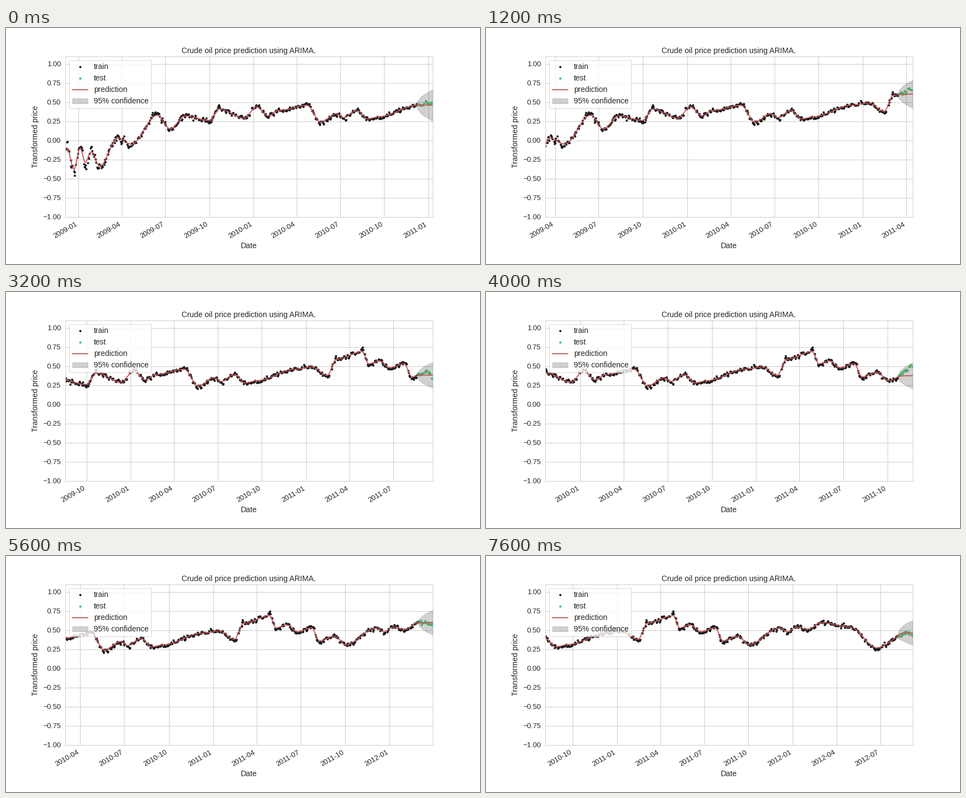
A matplotlib script that plays this animation: 864x432 px, repeating every 8000 ms.

```python
import numpy as np
import matplotlib.pyplot as plt
import matplotlib.dates as mdates
from matplotlib.animation import FuncAnimation

INK, BLACK = "0.15", (0.1, 0.1, 0.1)
GREEN, RED = "#55A868", "#C44E52"
FRAMES, INTERVAL = 20, 400
STEP = TEST = 22                         # trading days
TRAIN = 23 * STEP
START = np.datetime64("2008-12-04")

plt.rcParams.update({
    "font.family": "Liberation Sans", "font.size": 14,
    "text.color": INK, "axes.labelcolor": INK,
    "xtick.color": INK, "ytick.color": INK,
    "xtick.labelsize": 13, "ytick.labelsize": 13,
    "xtick.major.size": 0, "ytick.major.size": 0,
    "xtick.major.pad": 8, "ytick.major.pad": 8,
    "axes.edgecolor": "0.8", "axes.linewidth": 1, "axes.axisbelow": True,
    "axes.grid": True, "grid.color": "0.8", "grid.linewidth": 1,
    "axes.titlesize": 14, "legend.fontsize": 14,
})

# Turning points of the trend: (days since START, price in hundredths).
TURNS = [
    (4, -10), (18, -38), (31, -10), (42, -29), (54, -15), (72, -34),
    (110, 3), (138, -5), (192, 33), (219, 15), (250, 32), (300, 26),
    (322, 41), (374, 29), (399, 44), (424, 32), (445, 39), (505, 46),
    (533, 24), (567, 35), (581, 30), (609, 39), (631, 28), (655, 31),
    (735, 46), (770, 49), (802, 38), (821, 59), (875, 69), (888, 53),
    (910, 57), (932, 48), (962, 53), (978, 36), (1010, 42), (1032, 31),
    (1095, 53), (1112, 48), (1130, 54), (1155, 51), (1182, 60),
    (1242, 54), (1297, 27), (1360, 46), (1372, 44),
]


def trading_days(count):
    """Weekdays from START on, without the exchange holidays."""
    closed = ["2009-04-10", "2009-11-27", "2010-04-02", "2011-04-22", "2012-04-06"]
    for year in range(2008, 2013):
        # (month, which Monday or Thursday); -1 before June is the last of May
        for month, nth, weekday in (("01", 2, "Mon"), ("02", 2, "Mon"),
                                    ("06", -1, "Mon"), ("09", 0, "Mon"),
                                    ("11", 3, "Thu")):
            closed.append(np.busday_offset(f"{year}-{month}", nth,
                                           roll="forward", weekmask=weekday))
        for fixed in ("01-01", "07-04", "12-25"):
            date = np.datetime64(f"{year}-{fixed}")
            weekday = int((date.astype(int) + 3) % 7)
            shift = {5: 0 if fixed == "01-01" else -1, 6: 1}.get(weekday, 0)
            closed.append(date + shift)
    holidays = np.array(closed, dtype="datetime64[D]")
    return np.busday_offset(START, np.arange(count), roll="forward",
                            holidays=holidays)


def ease_between(x, points):
    """Smoothstep from one turning point to the next."""
    at, value = np.array(points, dtype=float).T
    i = np.clip(np.searchsorted(at, x, side="right") - 1, 0, len(at) - 2)
    t = np.clip((x - at[i]) / (at[i + 1] - at[i]), 0, 1)
    return value[i] + (value[i + 1] - value[i]) * t * t * (3 - 2 * t)


def blur(values, sigma):
    reach = int(4 * sigma)
    kernel = np.exp(-0.5 * (np.arange(-reach, reach + 1) / sigma) ** 2)
    return np.convolve(np.pad(values, reach, mode="edge"),
                       kernel / kernel.sum(), mode="valid")


dates = trading_days(STEP * (FRAMES - 1) + TRAIN + TEST)
days = (dates - START).astype(float)
trend = ease_between(days, TURNS) / 100

# Prices overshoot the trend at its turns and scatter less as time goes on.
noise = np.random.default_rng(4).normal(size=len(days))
noise = 0.8 * noise + 0.5 * np.roll(noise, 1)
scatter = 0.015 + 0.03 * np.exp(-days / 120)
price = trend + 0.7 * (trend - blur(trend, 4)) + scatter * noise

fig = plt.figure(figsize=(12, 6), dpi=72, facecolor="white")
ax = fig.add_axes([0.125, 0.2, 0.775, 0.68])
fig.text(442.8 / 864, 1 - 403 / 432, "Date", ha="center", va="baseline")
fig.text(58 / 864, 1 - 199 / 432, "Transformed price", rotation=90,
         rotation_mode="anchor", ha="center", va="baseline")


def draw(frame):
    first = STEP * frame
    split = first + TRAIN
    end = split + TEST
    train, test = slice(first, split), slice(split, end)

    # The forecast carries on the last slope, then levels off.
    ahead = np.arange(1, TEST + 1)
    last, slope = trend[split - 1], trend[split - 1] - trend[split - 2]
    forecast = last + 4 * slope * (1 - np.exp(-ahead / 4))
    half = (0.157 + 0.046 * np.exp(-frame / 6)) * np.sqrt(ahead / TEST)

    ax.clear()
    dots = dict(ls="none", marker=".", ms=8, mew=0)
    ax.plot(dates[train], price[train], color=BLACK, label="train", **dots)
    ax.plot(dates[test], price[test], color=GREEN, label="test", **dots)
    ax.plot(dates[first:end], np.concatenate([trend[train], forecast]),
            color=RED, lw=1.75, label="prediction")
    ax.fill_between(dates[test], forecast - half, forecast + half,
                    color=BLACK, alpha=0.2, lw=1, label="95% confidence")

    ax.set_xlim(dates[first], dates[end - 1])
    ax.set_ylim(-1, 1.1)
    ax.set_yticks(np.arange(-1, 1.01, 0.25))
    ax.xaxis.set_major_locator(mdates.MonthLocator((1, 4, 7, 10)))
    ax.xaxis.set_major_formatter(mdates.DateFormatter("%Y-%m"))
    plt.setp(ax.get_xticklabels(), rotation=30, ha="right")
    ax.set_title("Crude oil price prediction using ARIMA.", pad=6)
    ax.legend(loc="upper left", framealpha=0.8, edgecolor="0.8")


animation = FuncAnimation(fig, draw, frames=FRAMES, interval=INTERVAL, repeat=True)
plt.show()
```
